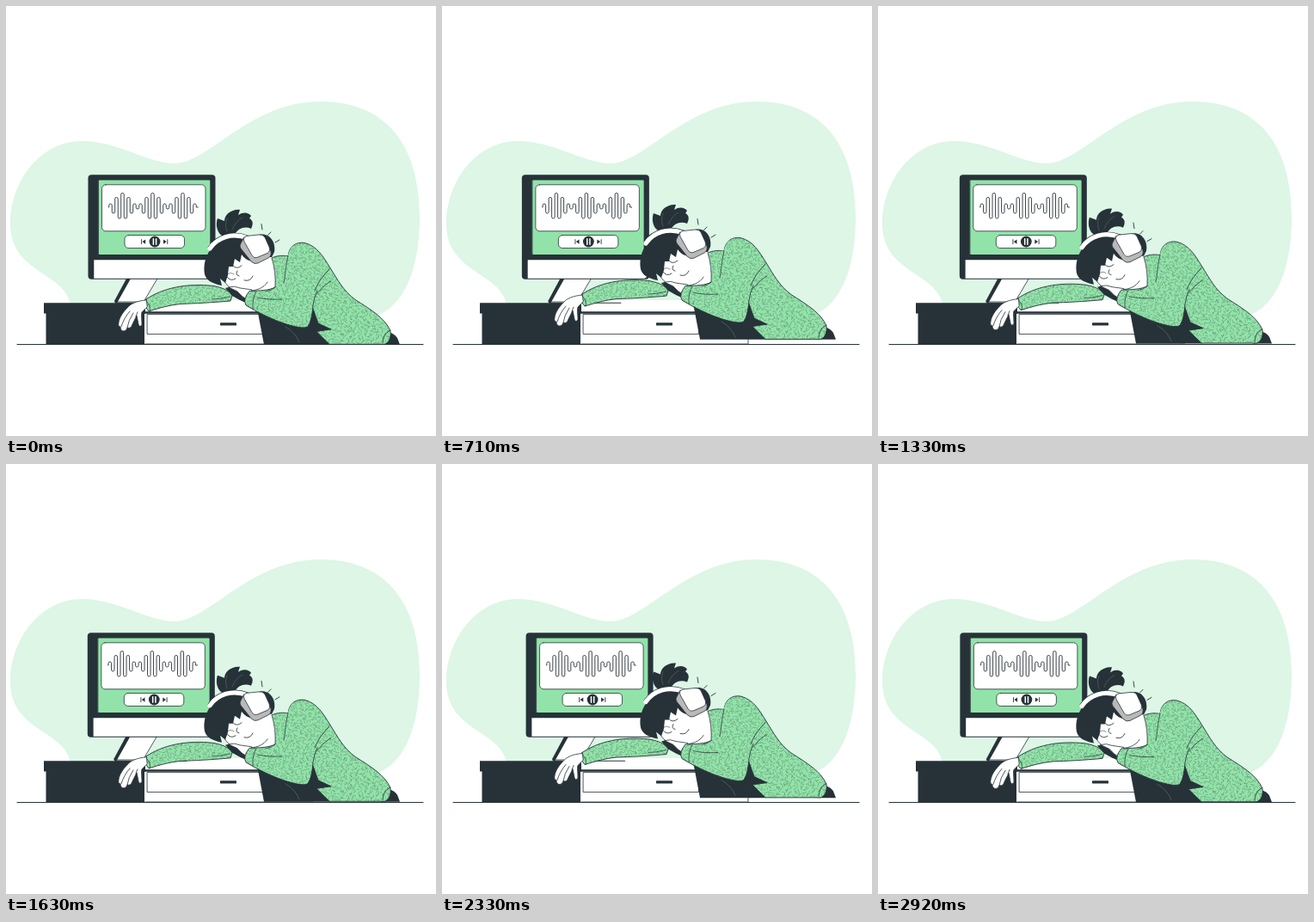
Recreate the animation shown at these times as an HTML page with a canvas. Size 500 by 500 pixels, loop 2.96 s.

```html
<!DOCTYPE html>
<html lang="en">
<head>
<meta charset="utf-8">
<title>Dozing to music</title>
<style>
html, body { margin: 0; width: 100%; height: 100%; overflow: hidden; background: #fff; }
canvas { display: block; width: 500px; height: 500px; }
</style>
</head>
<body>
<canvas id="stage"></canvas>
<script>
const LOOP = 2960, CYCLE = 1500;
const INK = '#263238', GREEN = '#92e3a9', PALE = '#ddf6e6', WHITE = '#fff', GREY = '#b9b9b9';

const canvas = document.getElementById('stage');
const ctx = canvas.getContext('2d');
const ratio = window.devicePixelRatio || 1;
canvas.width = canvas.height = 500 * ratio;

function shape(d, fill, line, width = 0.8) {
  const p = d instanceof Path2D ? d : new Path2D(d);
  if (fill) { ctx.fillStyle = fill; ctx.fill(p); }
  if (line) { ctx.strokeStyle = line; ctx.lineWidth = width; ctx.stroke(p); }
}

function box(x, y, w, h, r, fill, line, width) {
  const p = new Path2D();
  p.roundRect(x, y, w, h, r);
  shape(p, fill, line, width);
}

function seeded(seed) {
  return () => (seed = (seed * 16807) % 2147483647) / 2147483647;
}

// Short curved flecks for the knitted cloth
function makeKnit() {
  const rnd = seeded(4127), p = new Path2D(), step = 3.4;
  for (let y = 270; y < 396; y += step) {
    for (let x = 160; x < 452; x += step) {
      const cx = x + rnd() * 3, cy = y + rnd() * 3;
      const a = rnd() * Math.PI * 2, dx = Math.cos(a) * 1.4, dy = Math.sin(a) * 1.4;
      p.moveTo(cx - dx, cy - dy);
      p.quadraticCurveTo(cx - dy * 0.6, cy + dx * 0.6, cx + dx, cy + dy);
    }
  }
  return p;
}

// A winding line whose five peaks per group repeat three times
function makeWave() {
  const tops = [230, 222.5, 217.5, 222.5, 230];
  const lows = [241, 247, 247, 241, 236];
  const p = new Path2D(), half = 3.5, r = 1.75;
  let x = 119.75;
  p.moveTo(x - 0.5, 234);
  p.lineTo(x, 234);
  for (let i = 0; i < 15; i++) {
    p.arcTo(x, tops[i % 5], x + half / 2, tops[i % 5], r);
    p.arcTo(x + half, tops[i % 5], x + half, 234, r);
    x += half;
    if (i === 14) break;
    p.arcTo(x, lows[i % 5], x + half / 2, lows[i % 5], r);
    p.arcTo(x + half, lows[i % 5], x + half, 234, r);
    x += half;
  }
  p.lineTo(x, 234);
  p.lineTo(x + 2, 234);
  return p;
}

const knit = makeKnit(), wave = makeWave();

function cloth(d, edge = d) {
  const p = new Path2D(d);
  shape(p, GREEN);
  ctx.save();
  ctx.clip(p);
  ctx.globalAlpha = 0.62;
  shape(knit, null, INK, 0.45);
  ctx.restore();
  shape(edge, null, INK, 0.9);
}

function drawBackdrop() {
  shape('M75 347C68 309 5 311 5 253C5 204 40 157 88 157C130 157 165 183 196 183C236 183 283 111 366 111C446 111 481 167 481 245C481 306 463 350 428 361L300 365Z', PALE);
}

function drawDesk() {
  shape('M161 346L196 342H288L297 357V393H161Z', WHITE);
  shape('M297 357H356V393H162', WHITE, INK, 0.8);
  shape('M161 355.2H297V357.8H161Z', INK);
  box(164.5, 358.5, 134, 23, 0, WHITE, INK, 0.8);
  box(249, 368.3, 19, 3.2, 0.4, INK);
  shape('M44 345.2H162V357.5H161V393.5H46.5V357.5H44Z', INK);
  shape('M13 393.5H485', null, INK, 1);
}

function drawMonitor() {
  shape('M141 317L127 344H160L176 317Z', WHITE, INK, 0.8);
  shape('M140 317L126 343Q126 345.5 129 345.5L145 317Z', INK);
  shape('M128 345.3H210.5', null, INK, 1.1);
  box(95.5, 196.3, 148, 121.5, 4, INK);
  shape('M107.3 202.5V289', null, '#62706f', 0.5);
  box(108, 202.5, 129.3, 86.5, 1, GREEN);
  shape('M102.3 295.2H241V313Q241 316.7 237 316.7H102.3Z', WHITE);
  box(111.5, 207.8, 120.5, 54, 4.5, WHITE, INK, 0.8);
  shape(wave, null, INK, 0.9);
  box(138, 266.5, 69.5, 15, 4.5, WHITE, INK, 0.8);
  shape('M166.6 274A6.4 6.4 0 1 0 179.4 274A6.4 6.4 0 1 0 166.6 274Z', INK);
  shape('M171.4 270.8V277.2M174.6 270.8V277.2', null, WHITE, 1.5);
  shape('M162.2 271.4V276.8L158.5 274.1ZM183 271.4V276.8L186.7 274.1Z', INK);
  shape('M157.6 271.6V276.6M187.8 271.6V276.6', null, INK, 0.9);
}

function drawBody() {
  shape('M284 344L293 357L300 393.8H377L382 372L358 345Z', INK);
  shape('M325 373Q337 380 341 391', null, '#718078', 0.5);
  shape('M444 379Q452 381 455 386L458 393.8H436Z', INK);
  cloth('M309 293C316 290 322 290 328 291C329 279 338 274 347 275.5C362 279 369 292 376 303C386 319 392 331 406 341.5C424 353 441 363 447 378C448 386 445 392 440 393.4H376L361 378.5L378 376L363 369L357 352L330 345L313 327Q314 309 309 293Z');
  shape('M447 377Q438 381 438 392', null, INK, 0.8);
}

function drawReach() {
  cloth('M163 341C182 328 210 322 241 325.5C254 328 261 332 263 337L261 343C239 345 219 346 203 346.5C189 348 179 351 166 355Q160 349 163 341Z');
  shape('M261 338Q249 341 240 341M163 343Q169 349 167 355', null, INK, 0.7);
  shape('M163 342C152 343 145 346 141 351C136 356 132 362 131 368Q130 373 133 373Q133 378 137 378Q140 378 141 374Q145 376 147 370L152 360Q153 365 154 370Q155 374 158 371C158 364 157 359 158 356Q162 352 164 350Z', WHITE, INK, 0.8);
  shape('M144 355Q137 363 134 373M148 357Q142 366 141 374M153 356L151 361', null, INK, 0.8);
  shape('M255 328L268 325L286 336L283 347L272 342L263 337Z', INK);
}

function drawHead() {
  // Ponytail and the hair behind the ear
  shape('M251 267C244 262 244 252 246 247L254 250C254 243 262 236 272 237L270 243C276 239 282 240 285 244L283 247C287 249 288 253 285 259C278 256 270 258 266 266Z', INK);
  shape('M257 262Q254 254 257 247M263 260Q267 250 275 246', null, '#71807b', 0.45);
  shape('M294 266C306 263 314 274 312 286L308 294L298 297Z', INK);

  shape('M299 292L309 292Q315 309 313 328L292 333Z', WHITE);
  shape('M251 316C255 326 263 331 276 331.5C291 332 302 327 307 314L307 293L298 280L268 280Z', WHITE);
  shape('M254 320C258 328 265 331 276 331.5C291 332 300 328 304 321', null, INK, 0.8);
  shape('M231 312C228 294 238 275 258 268C272 263 282 270 286 280L289 297C281 297 277 293 274 289L272 298L266 294L264 303L259 303L258 313L255 322L249 317L251 325C240 323 233 319 231 312Z', INK);

  // Resting face
  shape('M264 302Q268 307 274 302M257 315Q261 321 267 317M269 308Q266 313 271 314M277 319Q284 321 287 314', null, INK, 0.85);
  shape('M258 312Q261 309 265 312', null, INK, 0.55);

  // Headphones
  shape('M238 281C246 269 263 263 281 270', null, INK, 6.5);
  shape('M237 282C246 269 263 263 281 270', null, WHITE, 5.2);
  shape('M277 269L301 275L308 285Q309 291 305 293L293 299Q289 301 285 297L273 282Q271 279 273 276Z', GREY, INK, 0.8);
  shape('M277 274Q275 269 280 267.5L294 266Q299 265.5 301 269L306 280Q308 285 304 287.5L292 292.5Q288 294 286 290Z', WHITE, INK, 0.8);
  shape('M297 253.5L298 260M308 263L304.5 266.5M318 272L313 275', null, INK, 0.9);
}

function drawSleeve() {
  shape('M259 327Q266 325 272 328L286 330L281 342Q274 338 269 332Z', WHITE, INK, 0.8);
  cloth('M313 293L328 291C329 279 338 275 347 277C360 281 368 293 370 306C369 319 361 331 357 348C356 360 354 370 350 373.5C337 377 300 361 279 348Q275 341 283 331.5C295 331 306 331 313 327Z',
    'M313 327C306 331 295 331 283 331.5Q275 341 279 348C300 361 337 377 350 373.5C354 370 356 360 357 348Q358 339 362 331');
  shape('M376 306Q364 318 359 331M377 320Q368 326 362 334', null, INK, 0.8);
  shape('M328 291C325 303 325 313 323 322M309 293Q314 309 313 327Q309 331 302 332M291 332Q286 340 287 352M292 339Q304 342 321 341', null, INK, 0.75);
}

// The standard CSS "ease" curve
function ease(x) {
  let lo = 0, hi = 1;
  const bez = (a, b, s) => 3 * a * s * (1 - s) ** 2 + 3 * b * s * s * (1 - s) + s ** 3;
  for (let i = 0; i < 18; i++) {
    const mid = (lo + hi) / 2;
    if (bez(0.25, 0.25, mid) < x) lo = mid; else hi = mid;
  }
  return bez(0.1, 1, lo);
}

const SHAKE = [0, -0.7, 1.4, -2.8, 2.8, -2.8, 2.8, -2.8, 1.4, -0.7, 0];

function shakeAt(p) {
  const i = Math.min(9, Math.floor(p * 10));
  return SHAKE[i] + (SHAKE[i + 1] - SHAKE[i]) * ease(p * 10 - i);
}

function moved(x, y, ...parts) {
  ctx.save();
  ctx.translate(x, y);
  parts.forEach(part => part());
  ctx.restore();
}

function draw(t) {
  const p = ((t + 6) / CYCLE) % 1;
  const lift = -6.2 * (1 - Math.abs(1 - 2 * p));
  ctx.setTransform(ratio, 0, 0, ratio, 0, 0);
  ctx.fillStyle = WHITE;
  ctx.fillRect(0, 0, 500, 500);
  ctx.lineCap = ctx.lineJoin = 'round';
  drawBackdrop();
  drawDesk();
  moved(shakeAt(p), 0, drawMonitor);
  moved(0, lift, drawBody, drawReach, drawHead, drawSleeve);
}

const start = performance.now();
function tick() {
  draw((performance.now() - start) % LOOP);
  requestAnimationFrame(tick);
}
draw(0);
requestAnimationFrame(tick);
</script>
</body>
</html>
```
